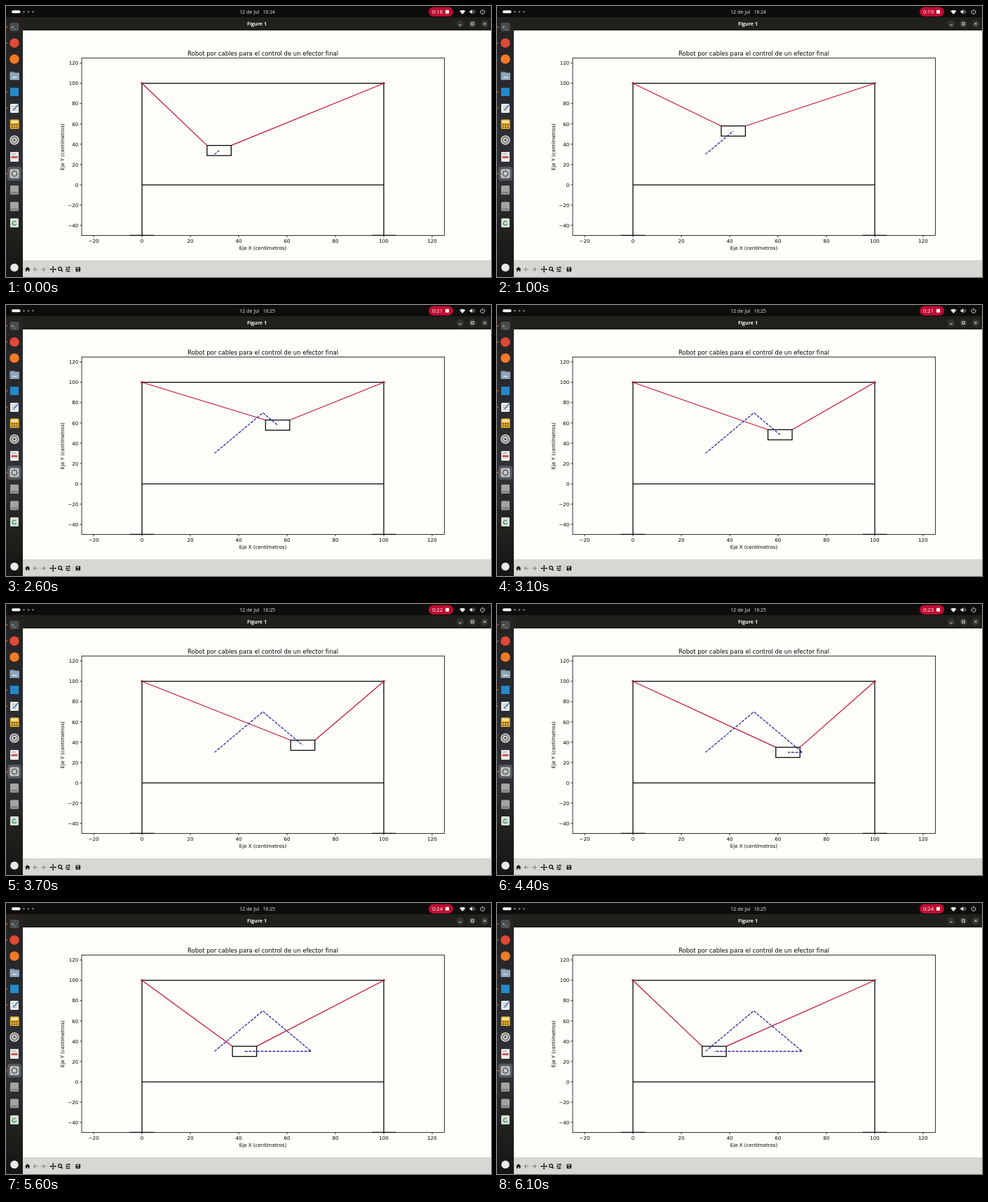
An HTML page with a canvas for the animation above (6.2 s loop, 692x388 px).

```html
<!DOCTYPE html>
<html lang="es">
<head>
<meta charset="utf-8">
<title>Robot por cables</title>
<style>
html, body { margin: 0; width: 100%; height: 100%; overflow: hidden; background: #fefffa; }
canvas { display: block; }
</style>
</head>
<body>
<canvas id="stage" width="692" height="388"></canvas>
<script>
const g = document.getElementById('stage').getContext('2d');
const LOOP = 6200, STEP = 100;
const PLOT = '"DejaVu Sans", sans-serif', UI = '"Open Sans", sans-serif';
const X = v => 194 + v * 3.45;
const Y = v => 256 - v * 1.453;

// Corners of the triangular route and [ms, legs travelled]
const route = [[30, 30], [50, 70], [70, 30], [30, 30]];
const progress = [[0, .095], [1000, .575], [2000, 1.03], [2600, 1.305],
                  [3700, 1.825], [5000, 2.425], [6100, 2.91]];

const mix = (a, b, k) => a + (b - a) * k;

function travelled(t) {
  const i = Math.max(1, progress.findIndex(p => p[0] >= t));
  const [a, b] = [progress[i - 1], progress[i]];
  return mix(a[1], b[1], (t - a[0]) / (b[0] - a[0]));
}

function rect(x, y, w, h, color, r = 0) {
  g.fillStyle = color;
  g.beginPath();
  g.roundRect(x, y, w, h, r);
  g.fill();
}

function disc(x, y, r, color) {
  g.fillStyle = color;
  g.beginPath();
  g.arc(x, y, r, 0, 7);
  g.fill();
}

function arc(x, y, r, from, to, color, width = 1) {
  g.strokeStyle = color;
  g.lineWidth = width;
  g.beginPath();
  g.arc(x, y, r, from, to);
  g.stroke();
}

function line(points, color = '#000', width = 1, dash = []) {
  g.strokeStyle = color;
  g.lineWidth = width;
  g.setLineDash(dash);
  g.beginPath();
  points.forEach(p => g.lineTo(...p));
  g.stroke();
  g.setLineDash([]);
}

function text(s, x, y, size, font, align = 'center', color = '#000', weight = '') {
  g.font = `${weight} ${size}px ${font}`;
  g.textAlign = align;
  g.fillStyle = color;
  g.fillText(s, x, y);
}

function drawTopBar(t) {
  const seconds = 18 + Math.floor((t + 700) / 1000);
  rect(0, 0, 692, 16, '#0d0d0c');
  rect(8, 6.2, 12.5, 4, '#fff', 2);
  [25.5, 32, 38.5].forEach(x => disc(x, 8.2, 1.3, '#7b7b7b'));
  text('12 de Jul', 333, 10.5, 7.2, UI, 'left', '#eee');
  text(t < 1300 ? '16:24' : '16:25', 384, 10.5, 6.8, UI, 'right', '#eee');
  rect(603, 1.5, 35, 13.5, '#c00c32', 7);
  text('0:' + seconds, 608, 10.8, 7.6, UI, 'left', '#fff');
  rect(627, 5.8, 5, 5, '#fff', .5);

  g.fillStyle = '#eee';
  g.beginPath();
  g.moveTo(651.3, 12);
  g.arc(651.3, 12, 6.3, -2.3, -.84);
  g.fill();
  g.beginPath();
  [[661.5, 7], [663, 7], [665.3, 4.7], [665.3, 11.8], [663, 9.6], [661.5, 9.6]].forEach(p => g.lineTo(...p));
  g.fill();
  arc(665, 8.3, 2.2, -.8, .8, '#eee', .8);
  arc(665, 8.3, 4, -.8, .8, '#888', .8);
  arc(680, 8.5, 3, -1, 4.14, '#eee', .9);
  line([[680, 4.5], [680, 8]], '#eee', .9);
}

function drawTitleBar() {
  rect(24, 16, 668, 19, '#20201d');
  text('Figure 1', 358, 27.8, 7.1, UI, 'center', '#f4f4f4', 'bold');
  [648, 665.5, 683].forEach(x => disc(x, 25.5, 5.2, '#353532'));
  line([[646.2, 27.2], [649.8, 27.2]], '#eee', .9);
  g.strokeStyle = '#eee';
  g.strokeRect(663.8, 23.8, 3.4, 3.4);
  line([[681.3, 23.8], [684.7, 27.2]], '#eee', .9);
  line([[684.7, 23.8], [681.3, 27.2]], '#eee', .9);
}

function drawDock() {
  const shade = g.createLinearGradient(0, 16, 0, 388);
  [[0, '#252220'], [.3, '#292a2f'], [.62, '#303236'], [.8, '#22231f'], [1, '#151514']]
    .forEach(s => shade.addColorStop(...s));
  rect(0, 16, 24, 372, shade);
  rect(2, 230, 20, 20, '#55585b', 4);
  [30, 53, 123, 146, 240].forEach(y => disc(1.3, y, 1, '#c7602c'));

  rect(5.5, 24, 13, 12, '#4a4d4e', 2);
  text('>_', 7, 31.5, 5.5, PLOT, 'left', '#eee');
  disc(12, 53, 6.8, '#df4938');
  disc(12, 76, 6.8, '#f27a26');
  rect(5.5, 94, 7, 4, '#6b7f92', 1);
  rect(5.5, 95.5, 13.5, 10.5, '#8fa6ba', 1.2);
  rect(9, 101.5, 6.5, 1.5, '#dce5eb');
  rect(6, 117, 12, 12, '#2489ca');

  rect(6, 140, 12, 13, '#eeeeea', 1.5);
  [143, 146, 149].forEach(y => rect(8, y, 7, .8, '#a0a6ac'));
  line([[10.5, 149], [17.5, 141.5]], '#3d78c2', 1.6);

  rect(5.8, 162.5, 12.8, 13.5, '#e9b32d', 1.6);
  rect(7.3, 164.2, 9.8, 3.2, '#f5e5b0');
  for (let i = 0; i < 6; i++) rect(7.5 + i % 3 * 3.5, i < 3 ? 169 : 172.5, 2.3, 2, '#6f531b');

  disc(12, 192, 6.8, '#d4d4d0');
  arc(12, 192, 4.3, 0, 7, '#4c4d4e', 1.2);
  disc(12, 192, 1.7, '#4c4d4e');

  rect(6, 209, 12, 14, '#ecebe8', 1);
  rect(7.5, 215, 9, 3, '#c75a5a');
  rect(8, 211.5, 6, 1, '#8795aa');

  rect(5.5, 233.5, 13, 13, '#c9cbca', 2.5);
  arc(12, 240, 3.5, 0, 7, '#626567', 1.5);
  for (let i = 0; i < 8; i++) {
    const c = Math.cos(i * Math.PI / 4), s = Math.sin(i * Math.PI / 4);
    line([[12 + 3.5 * c, 240 + 3.5 * s], [12 + 5.4 * c, 240 + 5.4 * s]], '#626567', 1.2);
  }
  [263.5, 287].forEach(y => {
    rect(6, y - 6.5, 12, 13, '#a3a4a2', 1.5);
    rect(7, y + 2.5, 10, 2.8, '#81827f');
  });
  rect(6, 304, 12, 13, '#d9ddd8', 1.5);
  arc(12, 311, 2.7, .3, 5.5, '#38a263', 1.5);
  disc(12, 374.5, 5.8, '#e8e8e6');
}

function drawToolbar() {
  const dark = '#111', dim = '#777';
  rect(24, 364, 668, 24, '#d7d7d3');
  g.fillStyle = dark;
  g.beginPath();
  [[27, 377], [30.7, 373.4], [34.4, 377], [33.4, 377], [33.4, 380], [31.6, 380], [31.6, 377.8],
   [29.8, 377.8], [29.8, 380], [28, 380], [28, 377]].forEach(p => g.lineTo(...p));
  g.fill();
  [[42, 1], [53, -1]].forEach(([x, d]) => {
    line([[x - 3 * d, 377], [x + 3 * d, 377]], dim, 1);
    line([[x, 374], [x - 3 * d, 377], [x, 380]], dim, 1);
  });
  [60, 95].forEach(x => line([[x, 370], [x, 383]], '#c3c3bf', .8));
  line([[63.5, 377], [70.7, 377]], dark, 1.1);
  line([[67.1, 373.4], [67.1, 380.6]], dark, 1.1);
  [[63.6, 377], [70.6, 377], [67.1, 373.5], [67.1, 380.5]].forEach(p => disc(...p, 1, dark));
  arc(77, 376.3, 2.4, 0, 7, dark, 1.2);
  line([[78.7, 378], [80.8, 380.2]], dark, 1.5);
  [[374.2, 90], [377, 86.5], [379.8, 89]].forEach(([y, x]) => {
    line([[85, y], [91.7, y]], dark, .9);
    rect(x - .6, y - 1.2, 1.3, 2.4, dark);
  });
  rect(99.5, 373.7, 6.6, 6.6, dark, .8);
  rect(100.7, 374.6, 3.6, 1.7, '#d7d7d3');
  disc(102.8, 378.4, 1, '#d7d7d3');
}

function drawAxes() {
  g.strokeStyle = '#000';
  g.lineWidth = .8;
  g.strokeRect(108, 74.5, 517.4, 254);
  const label = v => String(v).replace('-', '\u2212');
  for (let v = -20; v <= 120; v += 20) {
    line([[X(v), 328.5], [X(v), 331.2]], '#000', .8);
    text(label(v), X(v), 339.2, 7.04, PLOT);
  }
  for (let v = -40; v <= 120; v += 20) {
    line([[105.3, Y(v)], [108, Y(v)]], '#000', .8);
    text(label(v), 103.2, Y(v) + 2.7, 7.04, PLOT, 'right');
  }
  text('Robot por cables para el control de un efector final', 366.5, 70.5, 8.45, PLOT);
  text('Eje X (centímetros)', 366.5, 349, 7.04, PLOT);
  g.save();
  g.translate(83.3, 201.7);
  g.rotate(-Math.PI / 2);
  text('Eje Y (centímetros)', 0, 0, 7.04, PLOT);
  g.restore();
}

function drawRobot(t) {
  const u = travelled(t), leg = Math.floor(u);
  const [cx, cy] = [0, 1].map(i => mix(route[leg][i], route[leg + 1][i], u - leg));
  const left = X(cx - 5), right = X(cx + 5), top = Y(cy + 5), bottom = Y(cy - 5);
  const beam = Y(100), floor = Y(-50);

  line([[X(0), floor], [X(0), beam], [X(100), beam], [X(100), floor]], '#000', 1.25);
  line([[X(0), Y(0)], [X(100), Y(0)]], '#000', 1.25);
  [0, 100].forEach(x => line([[X(x - 5), 328.3], [X(x + 5), 328.3]], '#000', 1.3));

  line([[X(0), beam], [left, top]], '#c20f37', 1.2);
  line([[X(100), beam], [right, top]], '#c20f37', 1.2);
  [0, 100].forEach(x => disc(X(x), beam, 1.8, '#a32a38'));
  g.strokeStyle = '#000';
  g.lineWidth = 1.25;
  g.strokeRect(left, top, right - left, bottom - top);

  const trail = [...route.slice(0, leg + 1), [cx, cy]];
  line(trail.map(([x, y]) => [X(x), Y(y)]), '#14109a', 1.15, [3.95, 1.7]);
}

function frame(now) {
  const t = Math.floor(now % LOOP / STEP) * STEP;
  rect(0, 0, 692, 388, '#fefffa');
  drawAxes();
  drawRobot(t);
  drawToolbar();
  drawTitleBar();
  drawDock();
  drawTopBar(t);
  requestAnimationFrame(frame);
}
requestAnimationFrame(frame);
</script>
</body>
</html>
```
